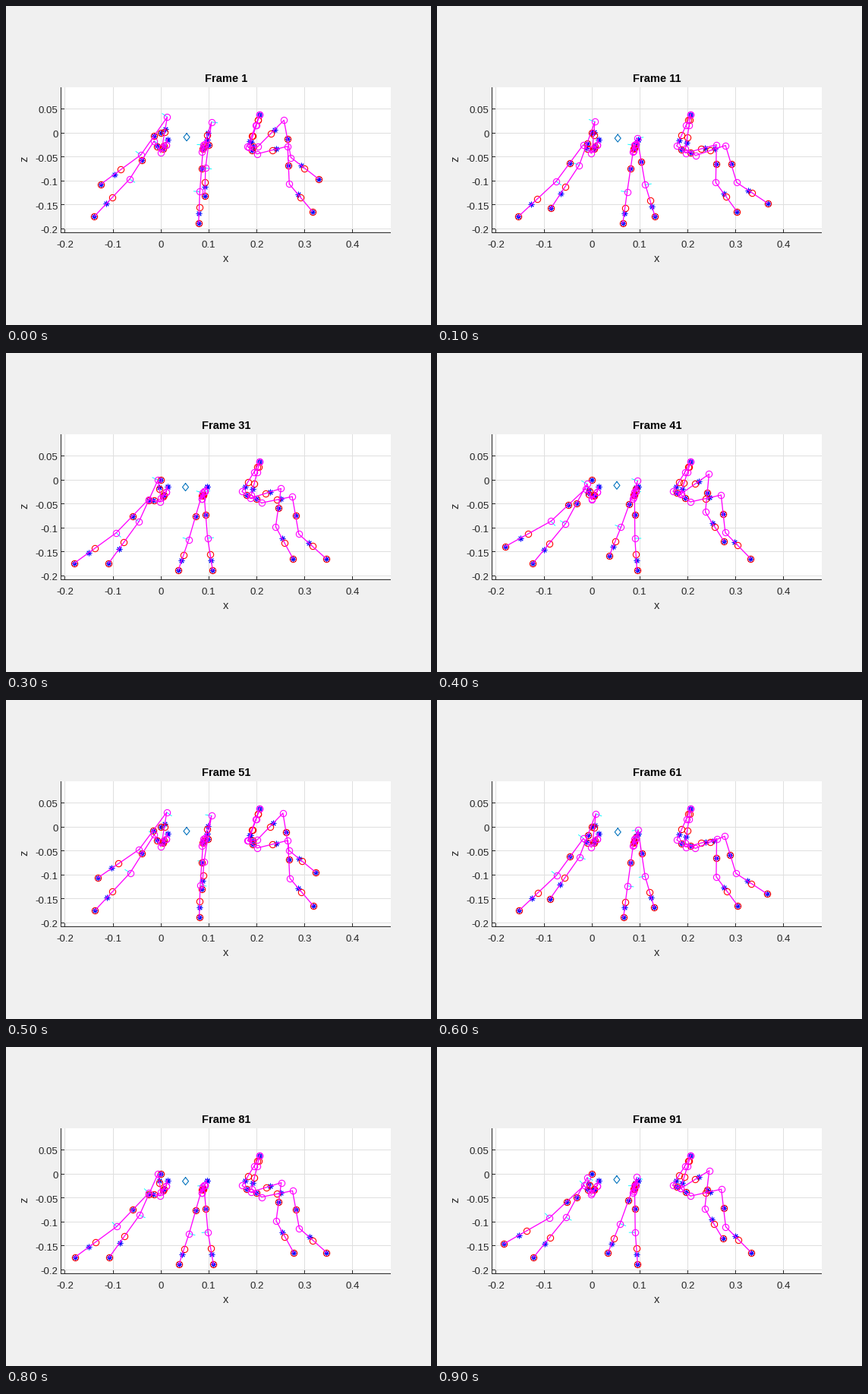
A matplotlib script for the animation above (1000 ms loop, 560 by 420 pixels).

```python
import numpy as np
import matplotlib.pyplot as plt
from matplotlib.animation import FuncAnimation
from matplotlib.patches import Rectangle

FRAMES, INTERVAL = 10, 100
PX = 0.72                                  # points per pixel at 100 dpi
INK, GRID, MAGENTA = "#262626", "#dfdfdf", "#ff00ff"
plt.rcParams["font.family"] = "Liberation Sans"

# Gait timing in animation frames, distances in pixels.
TOUCHDOWN, STANCE, SWING = 1.22, 7.4, 2.8
CYCLE = STANCE + SWING
FRONT_REACH, BACK_REACH, LIFT = 35, -31, 43


def gait(t):
    """Foot travel and height: steady on the ground, eased through the air."""
    phase = (t - TOUCHDOWN) % CYCLE
    if phase < STANCE:
        return FRONT_REACH + (BACK_REACH - FRONT_REACH) * phase / STANCE, 0
    u = np.pi * (phase - STANCE) / SWING
    ease = (1 - np.cos(u)) / 2
    return BACK_REACH + (FRONT_REACH - BACK_REACH) * ease, LIFT * np.sin(u)


def joint(x, y, per_travel=(0, 0), per_lift=(0, 0)):
    """Rest position, and how far it shifts per pixel of foot travel and lift."""
    return [(x, y), per_travel, per_lift]


class Leg:
    """Joints run from the body: base, [pivot], elbow, coxa, hip, knee, foot."""

    def __init__(self, joints, coxa_star, shin_star, axis_side=0):
        self.joints = np.array(joints, float)
        self.coxa_star, self.shin_star = coxa_star, shin_star
        self.axis_side = axis_side

    def pose(self, t):
        return np.array([1, *gait(t)]) @ self.joints


REAR = Leg([joint(212.5, 175.5),
            joint(211, 182.5),
            joint(203.6, 193, (0.03, -0.12), (0.04, -0.13)),
            joint(195, 178, (0.27, -0.56), (0.36, -0.64)),
            joint(162.7, 228, (0.66, -0.33), (0.22, -0.69)),
            joint(116, 277, (1, 0), (0, -1))], 0.6, 0.66, -1)
MIDDLE = Leg([joint(264.5, 175.5),
              joint(261.5, 182),
              joint(258.1, 192.4, (0, 0), (0.04, -0.12)),
              joint(259.9, 183, (0.04, -0.04), (0.25, -0.71)),
              joint(255.2, 244.5, (0.545, -0.04), (0.07, -0.73)),
              joint(253.3, 286.3, (1, 0), (0, -0.87))], 0.6, 0.68, 1)
FRONT = Leg([joint(334.4, 142.5),
             joint(329.2, 156.7, (0.09, 0)),
             joint(318.1, 185, (0.27, 0.1)),
             joint(330.6, 194.7, (0.31, 0.14), (-0.03, -0.26)),
             joint(371, 184.6, (0.325, 0.235), (-0.18, -0.86)),
             joint(373, 234.3, (0.67, 0.215), (-0.08, -0.87)),
             joint(403.3, 270.5, (0.955, 0), (0, -1.02))], 0.63, 0.37)


def mix(a, b, k=0.5):
    return a + (b - a) * k


def add_leg(leg, t, sign, marks):
    chain = leg.pose(t)
    base, (elbow, coxa, hip, knee, foot) = chain[0], chain[-5:]
    gap = (np.nan, np.nan)

    marks["limb"] += [*chain, gap]
    marks["joint"] += [*chain[1:-1]]
    marks["mass"] += [mix(elbow, coxa), mix(coxa, hip), mix(hip, knee),
                      mix(knee, foot), foot]
    marks["star"] += [base, mix(elbow, coxa), mix(coxa, hip, leg.coxa_star),
                      mix(hip, knee), mix(knee, foot, leg.shin_star), foot]
    if leg is FRONT:
        pivot = chain[1]
        marks["joint"].append(base)
        marks["mass"] += [mix(base, pivot), mix(pivot, elbow)]
        marks["star"].append(mix(pivot, elbow, 0.75))

    thigh = hip - knee
    normal = np.array([-thigh[1], thigh[0]]) / np.hypot(*thigh)
    for point in (hip, knee):
        marks["axis"] += [point, point + 8 * sign * leg.axis_side * normal, gap]


fig = plt.figure(figsize=(5.6, 4.2), dpi=100, facecolor="#f0f0f0")
ax = fig.add_axes([0, 0, 1, 1])
ax.set(xlim=(0, 560), ylim=(420, 0))
ax.axis("off")
ax.add_patch(Rectangle((73, 107), 434, 191, fc="white", ec="none", zorder=0))


def rule(xs, ys, color=INK, z=2):
    """One-pixel line through pixel centres."""
    ax.plot(np.floor(xs) + 0.5, np.floor(ys) + 0.5, color=color, lw=PX,
            zorder=z, snap=False, solid_capstyle="projecting")


def label(x, y, text, size=13.3, **style):
    style = {"color": INK, "ha": "center", "va": "center_baseline", **style}
    return ax.text(x, y, text, size=size * PX, **style)


for k in range(-2, 5):
    x = 204.1 + 63.07 * k
    rule([x, x], [107, 297], GRID, 1)
    rule([x, x], [294, 297])
    label(x, 314, f"{k / 10:g}")
for k in range(-4, 2):
    y = 167.2 - 31.57 * k
    rule([73, 506], [y, y], GRID, 1)
    rule([73, 76], [y, y])
    label(68.5, y + 1.3, f"{k / 20:g}", ha="right")
rule([72, 72, 506], [107, 298, 298])

label(290, 333, "x", 14.67, va="center")
label(24.5, 201.5, "z", 14.67, va="center", rotation=90)
title = label(290, 100, "", 14.67, weight="bold", color="black", va="baseline")


def series(color, z, marker=None, size=8.3, width=1.1):
    return ax.plot([], [], color=color, marker=marker, ms=size * PX, mfc="none",
                   mew=width * PX, lw=0 if marker else width * PX, zorder=z)[0]


artists = {
    "axis": series("#00ffff", 3, width=0.9),
    "star": series("#0000ff", 4, (8, 2, 0), 7.6, 1),
    "mass": series("#ff0000", 5, "o"),
    "limb": series(MAGENTA, 6, width=1.3),
    "joint": series(MAGENTA, 7, "o"),
}
diamond = series("#0072bd", 5)


def draw(i):
    marks = {name: [] for name in artists}
    marks["mass"].append((204.3, 167.2))
    marks["star"].append((204.3, 167.2))
    for leg in (REAR, MIDDLE, FRONT):
        add_leg(leg, i, 1, marks)
        add_leg(leg, i + CYCLE / 2, -1, marks)
    for name, line in artists.items():
        line.set_data(*np.array(marks[name]).T)

    # The body sways once per step.
    step = 4 * np.pi / CYCLE
    x = 237.4 + 0.9 * np.cos(step * (i - 0.6))
    y = 174.8 - 2.1 * np.cos(step * i)
    diamond.set_data(x + np.array([0, 4, 0, -4, 0]), y + np.array([-5, 0, 5, 0, -5]))
    title.set_text(f"Frame {10 * i + 1}")
    return [*artists.values(), diamond, title]


anim = FuncAnimation(fig, draw, frames=FRAMES, interval=INTERVAL, repeat=True,
                     repeat_delay=0, init_func=lambda: draw(0))
plt.show()
```
